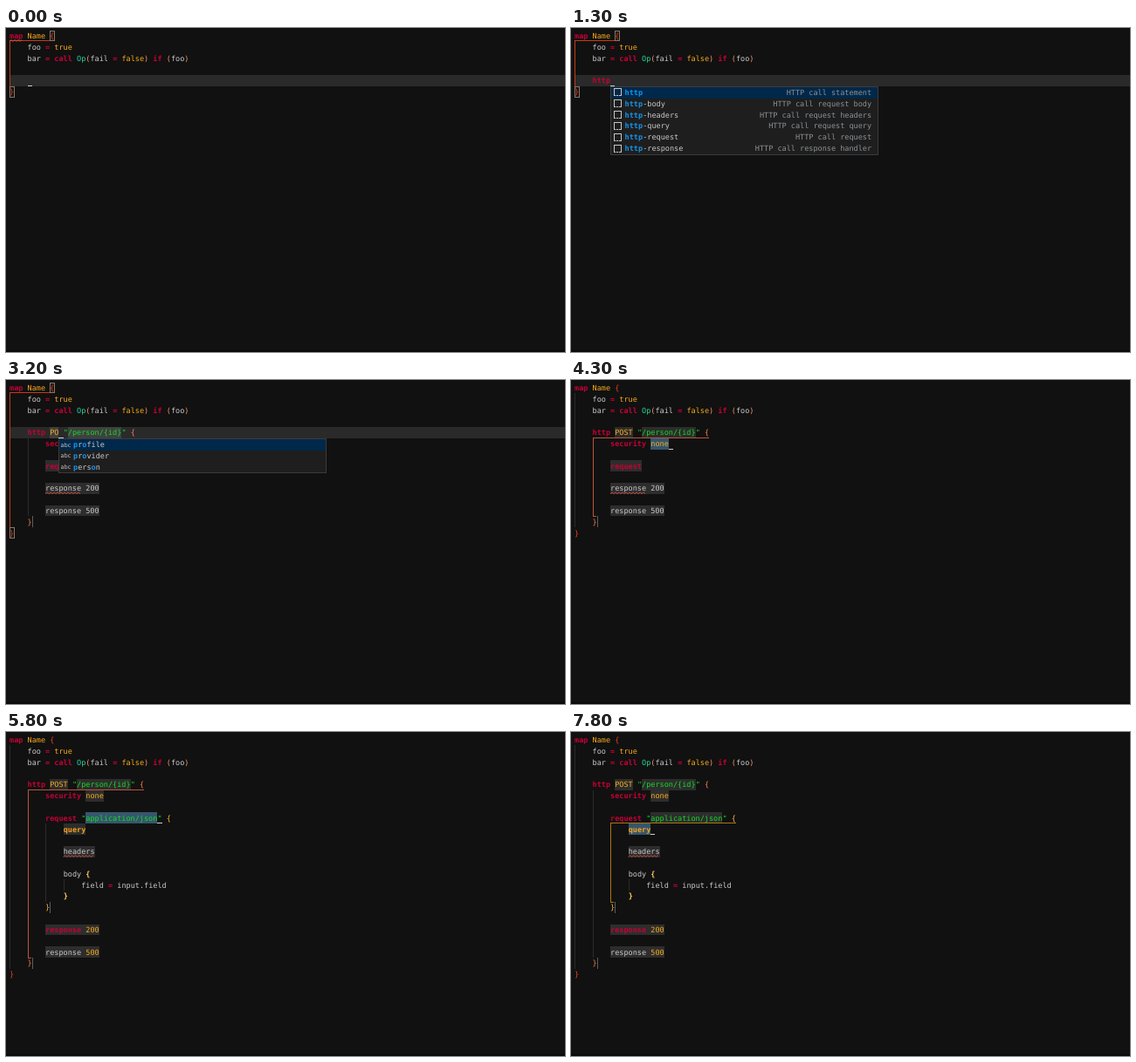
An HTML page with a canvas for the animation above (8 s loop, 640x372 px).

```html
<!DOCTYPE html>
<html lang="en">
<head>
<meta charset="utf-8">
<title>Editor snippets</title>
<style>
html, body { margin: 0; width: 100%; height: 100%; overflow: hidden; background: #111; }
canvas { display: block; }
</style>
</head>
<body>
<canvas id="stage" width="640" height="372"></canvas>
<script>
const ctx = document.getElementById('stage').getContext('2d');
const LOOP = 8000, SIZE = 8.53, CW = 5.136, LH = 12.82, LEFT = 4, TOP = 2.6;
const colors = {
  w: '#c9c9c9', r: '#c60035', o: '#f7ab1b', t: '#22d89c', s: '#12dc22', p: '#ff9763',
  0: '#f0421c', 1: '#ff7d4d', 2: '#ffb83c', 3: '#ffd060', q: '#f7a11b'
};
const bold = 'rq3';
const scopeColors = ['#c23d14', '#b9553a', '#a9760f'];

// Markup: ^x colour, [..] placeholder, <..> selection, ~..~ squiggle, | cursor, ! final tab stop
const tab = (text, on) => on ? `<${text}>|` : `[${text}]`;
const wrap = (mid, bad) => [
  bad ? '^r~map~ ^oName ^0{' : '^rmap ^oName ^0{',
  '    foo ^r= ^otrue',
  '    bar ^r= call ^tOp^p(^wfail ^r= ^ofalse^p) ^rif ^p(^wfoo^p)',
  '', ...mid, '^0}'
];
const typing = s => wrap([`    ^r${s}|`], !s);
const call = (method, stop, request = ['        [^rrequest]'], valid) => wrap([
  `    ^rhttp ^o${method} ^s"${tab('/person/{id}', stop === 'path')}" ^1{`,
  `        ^rsecurity ^o${tab('none', stop === 'security')}`,
  '', ...request, '',
  valid ? '        [^rresponse ^o200]' : '        [~response~ 200]',
  '', `        [response ${valid ? '^o' : ''}500]`,
  '    ^1}!'
]);
const post = (stop, request, valid) => call('[POST]', stop, request, valid);
const typeReq = s => post('', [`        [~${s}~|]`], true);
const request = stop => post('', [
  `        ^rrequest ^s"${tab('application/json', stop === 'type')}" ^2{`,
  `            ^q${tab('query', stop === 'query')}`, '',
  '            [~headers~]', '',
  '            body ^3{',
  '                field ^r= ^winput.field',
  '            ^3}',
  '        ^2}!'
], true);

const snippets = [
  ['http', 'HTTP call statement'], ['http-body', 'HTTP call request body'],
  ['http-headers', 'HTTP call request headers'], ['http-query', 'HTTP call request query'],
  ['http-request', 'HTTP call request'], ['http-response', 'HTTP call response handler']
];
const match = (s, list) => list.map(([name, info]) => [name.replace(s, `*${s}*`), info]);
const words = ['*p*r*o*file', '*p*r*o*vider', '*p*ers*o*n'].map(w => [w, '']);

// scopeRow keeps the bracket guide where it was while the cursor has already moved
const steps = [
  { at: -100, lines: typing('') },
  { at: 600, lines: typing('h') },
  { at: 700, lines: typing('h'), menu: match('h', [...snippets, ['foreach', 'Iteration statement']]) },
  { at: 900, lines: typing('ht'), menu: match('ht', snippets) },
  { at: 1000, lines: typing('htt'), menu: match('htt', snippets) },
  { at: 1200, lines: typing('http'), menu: match('http', snippets) },
  { at: 1900, lines: call('<GET>|') },
  { at: 2800, lines: call('[P|]') },
  { at: 3000, lines: call('[PO|]'), menu: words },
  { at: 3400, lines: call('[POS|]') },
  { at: 3500, lines: call('[POST|]') },
  { at: 3900, lines: post('path') },
  { at: 4200, lines: post('security') },
  { at: 4500, lines: post('', ['        ^r<request>|']) },
  { at: 4900, lines: typeReq('r') },
  { at: 5000, lines: typeReq('re'), menu: match('re', snippets.slice(4)) },
  { at: 5200, lines: typeReq('req'), menu: match('req', snippets.slice(4, 5)) },
  { at: 5800, lines: request('type') },
  { at: 6700, lines: request('query'), scopeRow: 7 },
  { at: 7600, lines: request('query'), blinkFrom: 6700 }
];

const px = col => LEFT + col * CW;
const py = row => TOP + row * LH;

function rect(x0, y0, x1, y1, color) {
  const x = Math.round(x0), y = Math.round(y0);
  ctx.fillStyle = color;
  ctx.fillRect(x, y, Math.max(1, Math.round(x1) - x), Math.max(1, Math.round(y1) - y));
}

function outline(x0, y0, x1, y1, color) {
  const x = Math.round(x0), y = Math.round(y0);
  ctx.strokeStyle = color;
  ctx.lineWidth = 1;
  ctx.strokeRect(x + .5, y + .5, Math.round(x1) - x - 1, Math.round(y1) - y - 1);
}

function write(text, x, rowTop, color, heavy, align = 'left') {
  ctx.font = `${heavy ? 'bold ' : ''}${SIZE}px "DejaVu Sans Mono", monospace`;
  ctx.textRendering = 'geometricPrecision';
  ctx.textAlign = align;
  ctx.fillStyle = color;
  ctx.fillText(text, x, rowTop + 9.36);
}

function squiggle(x0, x1, y) {
  ctx.beginPath();
  for (let x = x0, i = 0; x <= x1; x += 2, i++) ctx.lineTo(x, y + (i % 2 ? -.9 : .9));
  ctx.strokeStyle = '#d9513f';
  ctx.lineWidth = .9;
  ctx.stroke();
}

function parse(lines) {
  const page = { runs: [], marks: [], cursor: null, selected: false };
  lines.forEach((line, row) => {
    let col = 0, style = 'w';
    const open = {};
    const close = (key, kind) => page.marks.push({ kind, row, from: open[key], to: col });
    for (const [part, code] of line.matchAll(/\^(.)|[[\]<>~|!]|[^\^[\]<>~|!]+/g)) {
      if (code) style = code;
      else if (part === '[' || part === '<') open[part] = col;
      else if (part === ']') close('[', 'place');
      else if (part === '>') { close('<', 'select'); page.selected = true; }
      else if (part === '~') {
        if ('~' in open) close('~', 'wave');
        else open['~'] = col;
      }
      else if (part === '|') page.cursor = { row, col };
      else if (part === '!') page.marks.push({ kind: 'stop', row, from: col, to: col });
      else {
        page.runs.push({ text: part, row, col, style });
        col += part.length;
      }
    }
  });
  return page;
}

function findBlocks(lines) {
  const stack = [], blocks = [];
  lines.forEach((line, row) => {
    const text = line.replace(/\^.|[[\]<>~|!]/g, '');
    if (text.endsWith('{')) {
      stack.push({ start: row, brace: text.length - 1, col: text.search(/\S/), depth: stack.length });
    } else if (text.trim() === '}') blocks.push({ ...stack.pop(), end: row });
  });
  return blocks;
}

function drawBlocks(blocks, scopeRow, boxed) {
  const active = blocks.filter(b => b.start < scopeRow && scopeRow <= b.end)
    .sort((a, b) => b.depth - a.depth)[0];
  for (const b of blocks) {
    const x = px(b.col), y0 = py(b.start + 1), y1 = py(b.end);
    if (b !== active) {
      rect(x, y0, x + 1, y1, '#2b2b2b');
      continue;
    }
    const color = scopeColors[b.depth];
    rect(x, y0 - 1, px(b.brace + 1), y0, color);
    rect(x, y0 - 1, x + 1, y1, color);
    rect(x, y1, x + 4, y1 + 1, color);
    if (!boxed) continue;
    for (const [col, row] of [[b.brace, b.start], [b.col, b.end]])
      outline(px(col), py(row), px(col + 1) + 1, py(row + 1), '#8a7768');
  }
}

function drawIcon(x, y, isWord) {
  if (isWord) {
    ctx.font = '6.6px "DejaVu Sans", sans-serif';
    ctx.textAlign = 'left';
    ctx.fillStyle = '#c5c5c5';
    ctx.fillText('abc', x + 2, y + 9);
  } else {
    outline(x + 4, y + 2, x + 13, y + 11, '#c5c5c5');
    for (const dx of [6, 9]) rect(x + dx, y + 10, x + dx + 1, y + 11, '#4a4a4a');
  }
}

function drawMenu(items, { row, col }) {
  const x = px(col), y = py(row + 1), end = x + 307;
  rect(x, y, end, y + items.length * LH + 2, '#1e1e1e');
  rect(x, y + 1, end, y + 1 + LH, '#00284a');
  outline(x, y, end, y + items.length * LH + 2, items.length > 1 ? '#3b3b3b' : '#1c4061');
  items.forEach(([label, info], i) => {
    const top = y + .8 + i * LH;
    drawIcon(x, top, !info);
    let left = x + 16.5;
    label.split('*').forEach((part, j) => {
      write(part, left, top, j % 2 ? '#1494ec' : '#c9c9c9', j % 2);
      left += part.length * CW;
    });
    write(info, end - 8, top, '#8c9196', false, 'right');
  });
}

function draw(time) {
  const step = steps.findLast(s => s.at <= time);
  const { runs, marks, cursor, selected } = parse(step.lines);
  rect(0, 0, 640, 372, '#111');
  rect(0, 370, 640, 372, '#0b0909');
  if (!selected) rect(LEFT, py(cursor.row), 640, py(cursor.row + 1), '#2a2a2a');

  for (const m of marks) {
    if (m.kind === 'place' || m.kind === 'select')
      rect(px(m.from), py(m.row), px(m.to), py(m.row + 1),
        m.kind === 'place' ? 'rgba(124,124,124,.27)' : '#36566d');
    if (m.kind === 'stop') rect(px(m.to), py(m.row), px(m.to) + 1, py(m.row + 1), '#5c5c5c');
  }
  drawBlocks(findBlocks(step.lines), step.scopeRow ?? cursor.row, !selected);
  for (const r of runs) {
    const pad = r.text.search(/\S|$/);
    write(r.text.slice(pad), px(r.col + pad), py(r.row), colors[r.style], bold.includes(r.style));
  }
  for (const m of marks)
    if (m.kind === 'wave') squiggle(px(m.from), px(m.to), py(m.row + 1) - 1);

  if (step.menu) drawMenu(step.menu, cursor);
  const blink = Math.floor((time - (step.blinkFrom ?? step.at)) / 500) % 2;
  if (!blink) {
    const y = py(cursor.row + 1);
    rect(px(cursor.col), y - 1, px(cursor.col + 1), y, '#d0d0d0');
  }
}

const began = performance.now();
function frame() {
  draw((performance.now() - began) % LOOP);
  requestAnimationFrame(frame);
}
frame();
</script>
</body>
</html>
```
